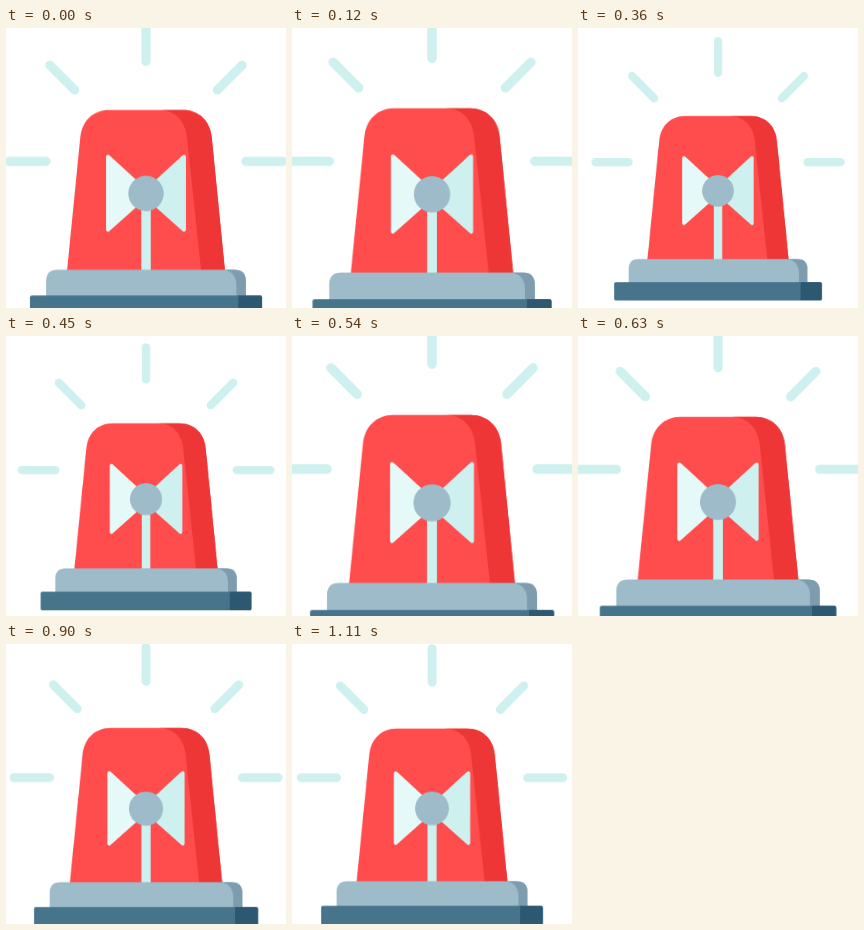
Write an HTML page without scripts that moves like this. It is 280x280 px and loops after 1140 ms.

```html
<!DOCTYPE html>
<html lang="en">
<head>
<meta charset="utf-8">
<title>Beating siren</title>
<style>
  html, body { margin: 0; width: 100%; height: 100%; overflow: hidden; background: #fff; }
  svg { display: block; width: 100vw; height: 100vh; }

  .siren {
    animation: beat 1140ms infinite;
    --out: cubic-bezier(.215, .61, .355, 1);
  }
  @keyframes beat {
    0% { transform: scale(.95); animation-timing-function: var(--out); }
    5% { transform: scale(1.1); animation-timing-function: cubic-bezier(.3, .45, .6, .9); }
    21% { transform: scale(.857); animation-timing-function: ease-out; }
    39% { transform: scale(.85); animation-timing-function: var(--out); }
    45% { transform: scale(1.01); animation-timing-function: linear; }
    60% { transform: scale(.95); animation-timing-function: var(--out); }
    100% { transform: scale(.909); }
  }

  .rays { fill: none; stroke: #cef0ee; stroke-width: 9.6; stroke-linecap: round; }
  .wing { stroke-width: 4; stroke-linejoin: round; }
  .pale { fill: #e5faf8; stroke: #e5faf8; }
  .mint { fill: #cef0ee; stroke: #cef0ee; }
</style>
</head>
<body>
<svg viewBox="-140 -140 280 280">
  <g class="siren">
    <path class="rays" d="M0-149V-112M-101-108L-75-82M101-108L75-82M-144-7H-105M144-7H105"/>

    <!-- dome -->
    <path fill="#ff4c4c" d="M-83 108L-69-33C-67-50-55-61-39-61H39C55-61 67-50 69-33L83 108Z"/>
    <path fill="#ee3636" d="M14-61H39C55-61 67-50 69-33L83 108H58L43-33C41-50 30-61 14-61Z"/>

    <!-- lamp -->
    <path fill="#cef0ee" d="M-5 40H5V108H-5Z"/>
    <path class="wing pale" d="M-40-12L-4 21V33L-40 65Z"/>
    <path class="wing mint" d="M40-12L4 21V33L40 65Z"/>
    <circle cy="26.8" r="18.6" fill="#9ebbc9"/>

    <!-- base -->
    <path fill="#9ebbc9" d="M-105 135V119Q-105 107-93 107H93Q105 107 105 119V135Z"/>
    <path fill="#7d9dae" d="M80 107H93Q105 107 105 119V135H95V122Q94 108 80 107Z"/>
    <rect x="-122" y="134" width="244" height="21.5" rx="2" fill="#45748b"/>
    <path fill="#2c5871" d="M97 134H120Q122 134 122 136V153.500Q122 155.500 120 155.500H97Z"/>
  </g>
</svg>
</body>
</html>
```
